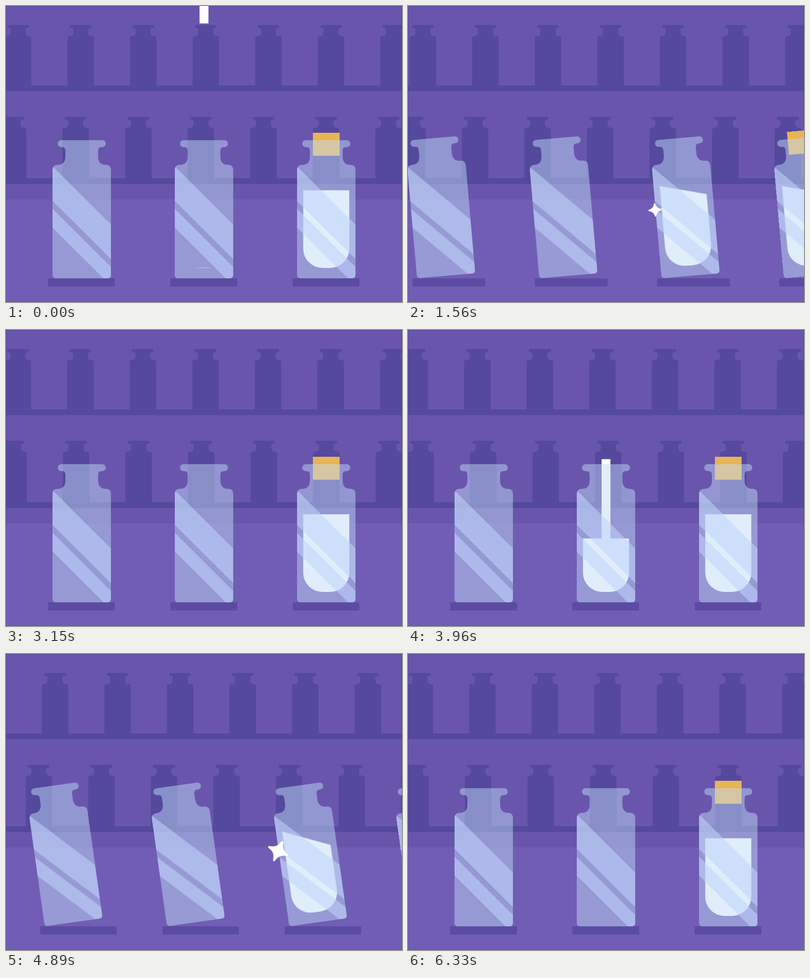
These frames come from a looping animation (800 px wide and 600 px high, 6360 ms). An HTML page without scripts:

```html
<!DOCTYPE html>
<html lang="en">
<head>
<meta charset="utf-8">
<title>Bottling line</title>
<style>
  html, body { margin: 0; width: 100%; height: 100%; overflow: hidden; background: #6956ac; }
  svg { display: block; width: 100vw; height: 100vh; }

  .anim { animation: 3180ms linear infinite; }

  .drift-left  { animation-name: drift-left; }
  .drift-right { animation-name: drift-right; }
  .drift-left, .drift-right { animation-timing-function: cubic-bezier(.826, 0, .16, 1); }
  @keyframes drift-left  { to { transform: translateX(-253.5px); } }
  @keyframes drift-right { to { transform: translateX(253.5px); } }

  .belt, .tilt, .tray, .slosh { animation-timing-function: cubic-bezier(.5, 0, .5, 1); }

  .belt { animation-name: belt; }
  @keyframes belt {
    0%, 34.91% { transform: none; }
    58.49%, 100% { transform: translateX(247px); }
  }

  .tilt { animation-name: tilt; transform-origin: 341px 552px; }
  @keyframes tilt {
    0%, 40.25% { transform: rotate(0deg); }
    56.29% { transform: rotate(-8.3deg); }
    65.09%, 100% { transform: rotate(0deg); }
  }

  .tray { animation-name: tray; transform-origin: 332px 560px; }
  @keyframes tray {
    0%, 40.25% { transform: scaleX(1); }
    56.29% { transform: scaleX(1.146); }
    65.09%, 100% { transform: scaleX(1); }
  }

  .slosh { animation-name: slosh; transform-origin: 400px 373.5px; }
  @keyframes slosh {
    0%, 40.25% { transform: translateY(0) skewY(0deg); }
    56.29% { transform: translateY(6.8px) skewY(24.4deg); }
    64.78% { transform: translateY(0) skewY(-11.5deg); }
    73.27% { transform: translateY(0) skewY(6deg); }
    81.76% { transform: translateY(0) skewY(-4deg); }
    89.94% { transform: translateY(0) skewY(3deg); }
    100% { transform: translateY(0) skewY(0deg); }
  }

  .fill { animation-name: fill; }
  @keyframes fill {
    0% { transform: translateY(156.8px); }
    3.77% { transform: translateY(156.5px); animation-timing-function: cubic-bezier(.3, .15, .8, .8); }
    24.53% { transform: translateY(49.5px); animation-timing-function: ease-out; }
    29.25%, 100% { transform: translateY(0); }
  }

  .stream { animation-name: stream; transform-origin: 400px 531px; }
  @keyframes stream {
    0% { transform: translateY(-499px) scaleY(1); }
    4.717%, 22.11% { transform: translateY(0) scaleY(1); }
    27.08%, 100% { transform: translateY(0) scaleY(0); }
  }

  .drop { animation-name: drop; }
  @keyframes drop {
    0%, 27.03% { transform: translateY(60px); opacity: 0; }
    27.04% { transform: translateY(60px); opacity: 1; animation-timing-function: ease-out; }
    31% { transform: translateY(calc(-1 * var(--rise))); animation-timing-function: ease-in; }
    33.02% { transform: none; }
    36%, 100% { transform: translateY(60px); opacity: 1; }
  }

  .plug { animation-name: plug; }
  @keyframes plug {
    0%, 74.53% { transform: translateY(-310px); animation-timing-function: ease-in; }
    82.08%, 100% { transform: none; }
  }

  .spark { animation-name: spark; }
  @keyframes spark {
    0%, 42.45% { transform: translate(340px, 434px) rotate(-45deg) scale(0); }
    49.06% { transform: translate(340px, 413px) rotate(0deg) scale(.61); }
    53.77% { transform: translate(340px, 398px) rotate(32deg) scale(1); }
    60.69%, 100% { transform: translate(340px, 376px) rotate(79deg) scale(0); }
  }
</style>
</head>
<body>
<svg viewBox="0 0 800 600" preserveAspectRatio="none">
  <defs>
    <path id="shape" d="M358.5 272H441.5a7 7 0 0 1 0 14H440q-7 0-7 7V305q0 17 16 17q10 0 10 11V546a6 6 0 0 1-6 6H347a6 6 0 0 1-6-6V333q0-11 10-11q16 0 16-17V293q0-7-7-7H358.5a7 7 0 0 1 0-14z"/>
    <clipPath id="inside"><use href="#shape"/></clipPath>
    <clipPath id="belly">
      <path d="M353.5 320H446.5V492a39 39 0 0 1-39 39H392.5a39 39 0 0 1-39-39z"/>
    </clipPath>

    <g id="glass">
      <use href="#shape" fill="#bfdaf7" fill-opacity=".487"/>
      <path clip-path="url(#inside)" fill="#bfd4fb" fill-opacity=".55"
        d="M341 325l118 118v70l-118-118zM341 411l118 118v38l-118-118z"/>
    </g>
    <rect id="base" x="332" y="552" width="135" height="16.5" fill="#5c4ba2"/>
    <rect id="cork" x="373" y="257" width="54" height="46.5" fill="#e9b455"/>
    <rect id="liquid" x="330" y="373.5" width="140" height="260" fill="#fff"/>

    <!-- background bottles, nine in a row -->
    <use id="small" href="#shape" transform="translate(-154.5 -123.2) scale(.453)"/>
    <g id="trio">
      <use href="#small"/>
      <use href="#small" x="126.4"/>
      <use href="#small" x="252.8"/>
    </g>
    <g id="row" fill="#54499d">
      <use href="#trio"/>
      <use href="#trio" x="379.2"/>
      <use href="#trio" x="758.4"/>
    </g>
  </defs>

  <rect width="800" height="600" fill="#6956ac"/>
  <rect y="392" width="800" height="208" fill="#715db5"/>
  <g class="anim drift-left"><use href="#row" x="-2.2" y="38.4"/></g>
  <g class="anim drift-right"><use href="#row" x="-265" y="224.4"/></g>
  <path fill="#54499d" d="M0 161H800v11.7H0zM0 349H800v12H0z"/>
  <path d="M.5 392V.5H799.5V392" fill="none" stroke="#4c3f8d" stroke-opacity=".7"/>
  <path d="M.5 392V599.5H799.5V392" fill="none" stroke="#5c50a8" stroke-opacity=".6"/>

  <g class="anim belt">
    <g transform="translate(-494)">
      <use class="anim tray" href="#base"/>
      <g class="anim tilt"><use href="#glass"/></g>
    </g>

    <g transform="translate(-247)">
      <use class="anim tray" href="#base"/>
      <g class="anim tilt"><use href="#glass"/></g>
    </g>

    <g transform="translate(247)">
      <use class="anim tray" href="#base"/>
      <g class="anim tilt">
        <g clip-path="url(#belly)"><use class="anim slosh" href="#liquid"/></g>
        <use href="#cork"/>
        <use href="#glass"/>
      </g>
    </g>

    <!-- the bottle being filled -->
    <g>
      <use class="anim tray" href="#base"/>
      <g class="anim tilt">
        <g clip-path="url(#belly)">
          <g class="anim fill"><use class="anim slosh" href="#liquid"/></g>
        </g>
        <rect class="anim stream" x="391" width="18" height="531" fill="#fff"/>
        <circle class="anim drop" style="--rise: 18px" cx="400" cy="342" r="5" fill="#fff"/>
        <circle class="anim drop" style="--rise: 8px" cx="400" cy="358.5" r="8.7" fill="#fff"/>
        <use class="anim plug" href="#cork"/>
        <use href="#glass"/>
        <path class="anim spark" d="M0-20Q3-3 20 0Q3 3 0 20Q-3 3-20 0Q-3-3 0-20z"
          fill="#fff" stroke="#fff" stroke-width="4.5" stroke-linejoin="round"/>
      </g>
    </g>
  </g>
</svg>
</body>
</html>
```
